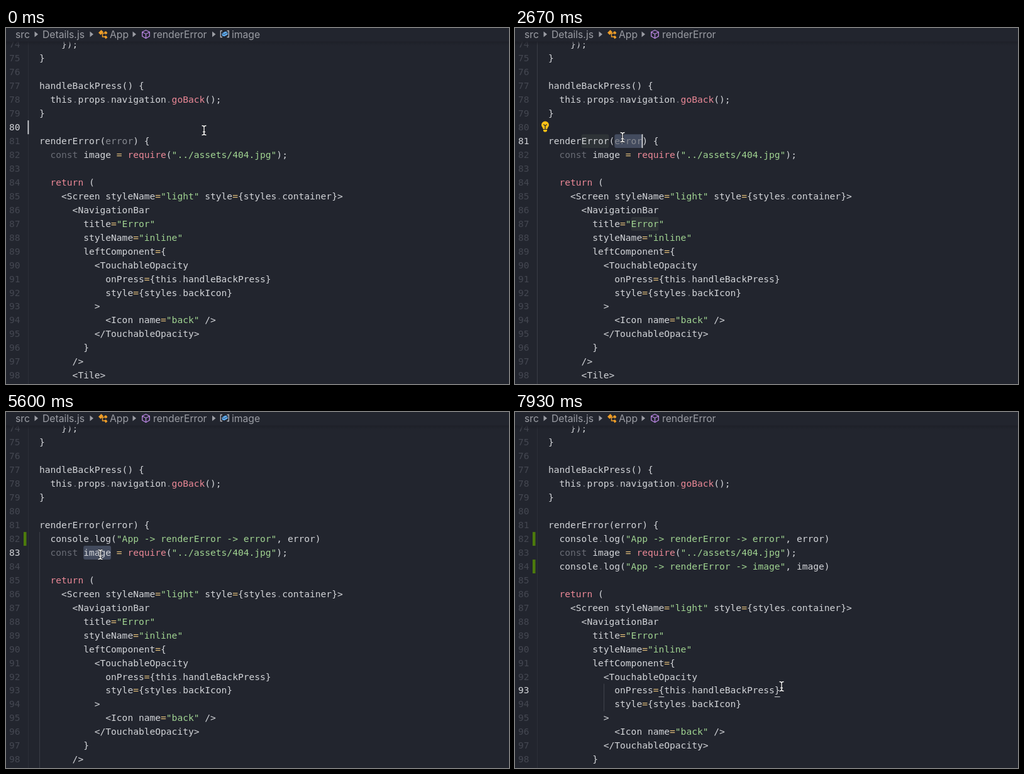
These frames come from a looping animation (800 px wide and 567 px high, 8000 ms). An HTML page with a canvas:

```html
<!DOCTYPE html>
<html lang="en">
<head>
<meta charset="utf-8">
<title>Code editor</title>
<style>
  html, body { margin: 0; width: 100%; height: 100%; overflow: hidden; background: #22252e; }
  canvas { display: block; }
</style>
</head>
<body>
<canvas width="800" height="567"></canvas>
<script>
const ctx = document.querySelector('canvas').getContext('2d');
const LOOP = 8000, FIRST_LINE = 74, LAST_LINE = 98;
const CHAR = 8.777, LEFT = 35.4, ROW = 21.96;
const CODE_FONT = '14.58px "DejaVu Sans Mono", monospace';
const UI_FONT = '15.7px Inter, sans-serif';
const BG = '#22252e', TEXT = '#d2d4d8', DIM = '#696c75', FADED = '#85888f';
const PINK = '#ea8896', GREEN = '#a0d391', YELLOW = '#e8c27c';

const FIRST_INSERT = 3130, SECOND_INSERT = 6130;
const source = `      });
  }

  handleBackPress() {
    this.props.navigation.goBack();
  }

  renderError(error) {
    const image = require("../assets/404.jpg");

    return (
      <Screen styleName="light" style={styles.container}>
        <NavigationBar
          title="Error"
          styleName="inline"
          leftComponent={
            <TouchableOpacity
              onPress={this.handleBackPress}
              style={styles.backIcon}
            >
              <Icon name="back" />
            </TouchableOpacity>
          }
        />
        <Tile>`.split('\n');
const logLine = name => `    console.log("App -> renderError -> ${name}", ${name})`;

// Caret states: blinking restarts at each one.
const carets = [
  { at: 0, line: 80, col: 0 },
  { at: 1200, line: 81, col: 15 },
  { at: 1340, line: 81, col: 19, from: 14 },
  { at: 4980, line: 83, col: 13 },
  { at: 5100, line: 83, col: 15, from: 10 },
  { at: 7200, line: 93, col: 44 }
];
const crumbs = [
  { at: 0, depth: 3 }, { at: 300, depth: 1 }, { at: 1400, depth: 2 },
  { at: 5350, depth: 3 }, { at: 7500, depth: 2 }
];
// Pointer moves: start, end, from, to; it rests until hidden.
const moves = [
  { at: 0, start: 300, end: 1100, from: [315, 163], to: [171, 174], hide: FIRST_INSERT },
  { at: 4450, start: 4450, end: 4900, from: [171, 174], to: [150, 227], hide: SECOND_INSERT },
  { at: 6700, start: 6700, end: 7150, from: [150, 227], to: [424, 437], hide: LOOP }
];

const latest = (list, t) => list.filter(item => item.at <= t).pop();
const colX = col => LEFT + col * CHAR;
const rowTop = line => 37.4 + (line - 75) * ROW;
const baseline = line => Math.round(53.2 + (line - 75) * ROW);

function box(color, x, y, w, h, radius = 0) {
  ctx.fillStyle = color;
  ctx.beginPath();
  ctx.roundRect(x, y, w, h, radius);
  ctx.fill();
}

function stroke(color, width, d) {
  ctx.strokeStyle = color;
  ctx.lineWidth = width;
  ctx.stroke(new Path2D(d));
}

function fill(color, d) {
  ctx.fillStyle = color;
  ctx.fill(new Path2D(d));
}

function put(text, x, y, color) {
  ctx.fillStyle = color;
  [...text].forEach((ch, i) => ch !== ' ' && ctx.fillText(ch, x + i * CHAR, y));
}

function codeLine(text, line, paramUsed) {
  const tokens = /("[^"]*")|(return|require|goBack)|(const|\.)|(=)|((?<=\()error(?=\) \{))|[^"=.]/g;
  for (const m of text.matchAll(tokens)) {
    const color = m[1] ? GREEN : m[2] ? PINK : m[3] ? DIM : m[4] ? YELLOW
      : m[5] && !paramUsed ? FADED : TEXT;
    put(m[0], colX(m.index), baseline(line), color);
  }
}

function visibleCode(t) {
  const lines = source.slice();
  if (t >= FIRST_INSERT) lines.splice(82 - FIRST_LINE, 0, logLine('error'));
  if (t >= SECOND_INSERT) lines.splice(84 - FIRST_LINE, 0, logLine('image'));
  return lines.slice(0, LAST_LINE - FIRST_LINE + 1);
}

function guide(col, from, to, color) {
  box(color, Math.round(colX(col)), rowTop(from), 1, (to - from + 1) * ROW);
}

function drawEditor(t) {
  const caret = latest(carets, t);
  const lines = visibleCode(t);
  ctx.font = CODE_FONT;

  guide(0, 74, 99, caret.line === 81 ? '#3a3d46' : '#2c2f38');
  if (caret.line === 83) guide(2, 82, 99, '#3a3d46');
  if (caret.line === 93) guide(12, 93, 94, '#40434c');

  const mark = (color, line, from, to) =>
    box(color, colX(from), rowTop(line), (to - from) * CHAR, ROW, 3);
  if (caret.from !== undefined) {
    if (caret.line === 81) {
      mark('#2e3337', 81, 8, 13);
      mark('#2e3337', FIRST_LINE + lines.findIndex(s => s.includes('title=')), 17, 22);
    }
    mark('#434b5e', caret.line, caret.from, caret.col);
  }

  lines.forEach((text, i) => {
    const line = FIRST_LINE + i;
    put(String(line), 5, baseline(line), line === caret.line ? TEXT : '#444751');
    codeLine(text, line, t >= FIRST_INSERT);
  });

  if (t >= 3600) box('#4c7a0c', 28, rowTop(82), 4.5, ROW);
  if (t >= 6600) box('#4c7a0c', 28, rowTop(84), 4.5, ROW);
  if (caret.line === 93) {
    for (const col of [22, 43]) box(TEXT, colX(col), rowTop(93) + ROW - 1.5, CHAR, 1);
  }
  if ((t - caret.at) % 1000 < 500) {
    box(TEXT, Math.round(colX(caret.col)) - 0.5, rowTop(caret.line), 1.8, ROW);
  }
  if (t >= 1560 && t < FIRST_INSERT) drawBulb(48, 157);
}

function drawBulb(x, y) {
  ctx.save();
  ctx.translate(x, y);
  fill('#fbc116', 'M-6-2.5A6 6 0 0 1 6-2.5C6 0 3.5 1.5 3.2 4H-3.2C-3.5 1.5-6 0-6-2.5Z');
  fill('#fbc116', 'M-3 5H3V7L1.5 8.5H-1.5L-3 7Z');
  stroke(BG, 1.2, 'M-2.6-3.5L0-1L2.6-3.5M0-1V4');
  ctx.restore();
}

function drawHeader(t) {
  const gray = '#9b9da4', depth = latest(crumbs, t).depth;
  const shade = ctx.createLinearGradient(0, 21, 0, 28);
  shade.addColorStop(0, 'rgba(29,31,39,.9)');
  shade.addColorStop(1, 'rgba(29,31,39,0)');
  box(shade, 0, 21, 800, 7);
  box(BG, 0, 0, 800, 21.5);

  ctx.font = UI_FONT;
  const label = (text, x) => { ctx.fillStyle = gray; ctx.fillText(text, x, 15.5); };
  const chevron = x => fill(gray, `M${x} 5.5L${x + 5.5} 10L${x} 14.5Z`);
  label('src', 15);
  chevron(45.5);
  label('Details.js', 58);
  chevron(133.5);
  fill('#ee9d28', 'M147 7.5L151.5 3L155 6.5L150.5 11ZM156 6.5L159 5L161.5 8L158.5 10.5ZM156 13.5L159 12L161.5 15L158.5 17.5Z');
  stroke('#ee9d28', 1.4, 'M152 8.5H157M153.5 8.5V14H157');
  label('App', 165);
  if (depth < 2) return;
  chevron(201.5);
  stroke('#b180d7', 1.4, 'M222.5 3.5L228.3 6.5V13L222.5 16.5L216.7 13V6.5ZM216.7 6.5L222.5 9.5L228.3 6.5M222.5 9.5V16.5');
  label('renderError', 234);
  if (depth < 3) return;
  chevron(328);
  stroke('#b8bac0', 1.3, 'M344 4.5H341.3V14.5H344M351.5 4.5H354.3V14.5H351.5');
  fill('#62b0f5', 'M343.5 8.5L349 5.5L352.5 7V10.5L347 13.5L343.5 12Z');
  stroke(BG, 0.8, 'M344 9L347 10.3L352 7.5');
  label('image', 359);
}

function drawPointer(t) {
  const move = latest(moves, t);
  if (t >= move.hide) return;
  const p = Math.min(1, Math.max(0, (t - move.start) / (move.end - move.start)));
  const ease = p * p * (3 - 2 * p);
  const [x, y] = move.from.map((a, i) => a + (move.to[i] - a) * ease);
  const beam = 'M-3.5-7.5Q0-7.5 0-5Q0-7.5 3.5-7.5M0-5V5M-3.5 7.5Q0 7.5 0 5Q0 7.5 3.5 7.5M-2 2.5H2';
  ctx.save();
  ctx.translate(x, y);
  stroke('#15171c', 3.2, beam);
  stroke('#f2f2f2', 1.4, beam);
  ctx.restore();
}

function frame(now) {
  const t = now % LOOP;
  box(BG, 0, 0, 800, 567);
  drawEditor(t);
  drawHeader(t);
  drawPointer(t);
  requestAnimationFrame(frame);
}
requestAnimationFrame(frame);
</script>
</body>
</html>
```
